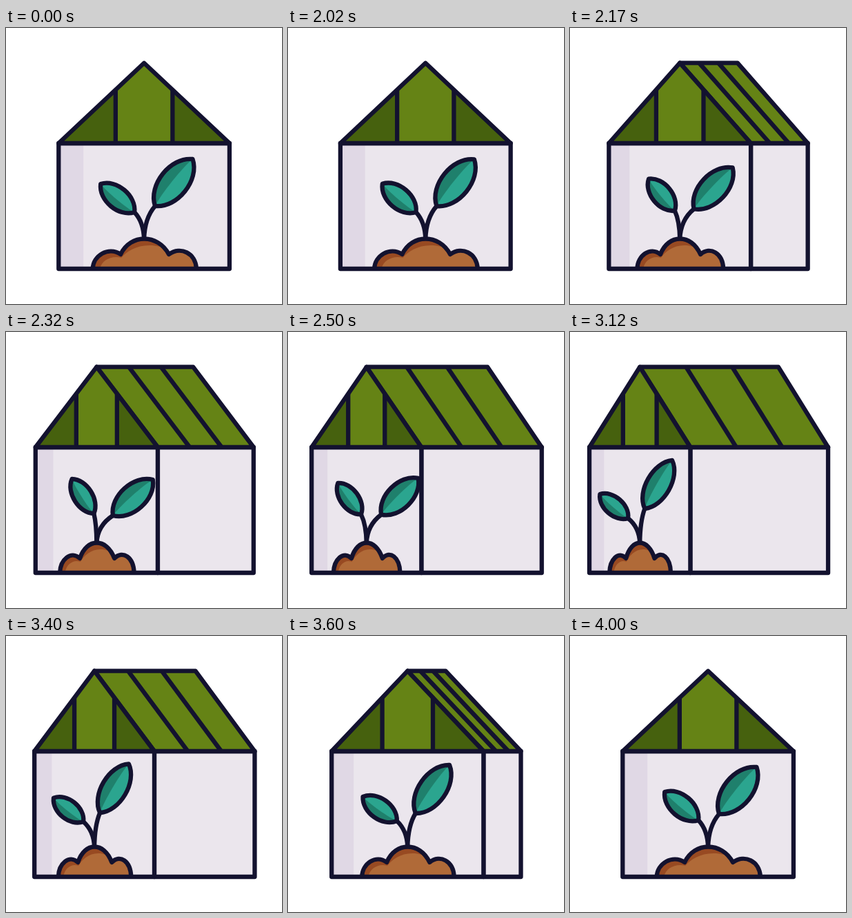
Write an HTML page with a canvas that moves like this. It is 400 px wide and 400 px high and loops after 4020 ms.

```html
<!DOCTYPE html>
<html lang="en">
<head>
<meta charset="utf-8">
<title>Greenhouse</title>
<style>
html, body { margin: 0; width: 100%; height: 100%; overflow: hidden; background: #fff; }
canvas { display: block; width: 400px; height: 400px; }
</style>
</head>
<body>
<canvas id="stage"></canvas>
<script>
const canvas = document.getElementById('stage');
const ctx = canvas.getContext('2d');
const dpr = window.devicePixelRatio || 1;
canvas.width = canvas.height = 400 * dpr;

const LOOP = 4020;
const INK = '#13122f', WALL = '#ebe6ed', SHADE = '#e0d8e5';
const ROOF = '#658315', ROOF_DARK = '#46610e';
const LEAF = '#2ba58f', LEAF_DARK = '#1f806c';
const SOIL = '#b06a38', SOIL_DARK = '#984a22';
const TOP = 50.7, EAVE = 167, FLOOR = 349;

// Sway poses: [x, y] of leaf base and tip, from the foot of the stem
const TIMES = [2000, 2320, 2720, 3120, 3600, 4000];
const RIGHT = [
  [16, -46, 70.5, -114], [33, -38, 114, -90], [29, -43, 109, -101],
  [12, -48, 79.5, -118], [13, -47, 68.5, -117], [16, -46, 70.5, -114]
];
const LEFT = [
  [-14, -37, -63, -78], [-5.6, -41, -50, -91], [-22.5, -37, -86, -75],
  [-29, -34, -98, -69], [-17.5, -36, -73, -71], [-14, -37, -63, -78]
];

function bezier(x1, x2, u) {
  if (u <= 0) return 0;
  if (u >= 1) return 1;
  let lo = 0, hi = 1;
  for (let i = 0; i < 30; i++) {
    const s = (lo + hi) / 2, r = 1 - s;
    if (3 * r * r * s * x1 + 3 * r * s * s * x2 + s * s * s < u) lo = s;
    else hi = s;
  }
  return lo * lo * (3 - 2 * lo);
}

// How far the house is turned: 0 front view, 1 fully turned
function turn(t) {
  return t < 3000
    ? bezier(0.14, 0.09, (t - 2000) / 1000)
    : 1 - bezier(0.59, 0.4, (t - 3000) / 1000);
}

function pose(keys, t) {
  if (t <= 2000 || t >= 4000) return keys[0];
  let i = 0;
  while (t >= TIMES[i + 1]) i++;
  const h = TIMES[i + 1] - TIMES[i], u = (t - TIMES[i]) / h;
  const slope = (k, n) => k < 1 || k > 4 ? 0
    : (keys[k + 1][n] - keys[k - 1][n]) / (TIMES[k + 1] - TIMES[k - 1]);
  return keys[i].map((a, n) => {
    const b = keys[i + 1][n], v = 1 - u;
    return a * (1 + 2 * u) * v * v + b * u * u * (3 - 2 * u)
      + h * (slope(i, n) * u * v * v - slope(i + 1, n) * u * u * v);
  });
}

function poly(points, fill, closed = true) {
  ctx.beginPath();
  points.forEach(([x, y]) => ctx.lineTo(x, y));
  if (closed) ctx.closePath();
  if (fill) { ctx.fillStyle = fill; ctx.fill(); }
}

function ink() {
  ctx.strokeStyle = INK;
  ctx.lineWidth = 6.3;
  ctx.lineJoin = 'round';
  ctx.stroke();
}

function line(x1, y1, x2, y2) {
  poly([[x1, y1], [x2, y2]], null, false);
  ink();
}

function box(x1, x2) {
  ctx.beginPath();
  ctx.rect(x1, EAVE, x2 - x1, FLOOR - EAVE);
}

function leafPath(bx, by, tx, ty, left, right) {
  const dx = tx - bx, dy = ty - by, len = Math.hypot(dx, dy);
  const nx = dy / len, ny = -dx / len;
  const at = (k, w) => [bx + dx * k + nx * w * 4 / 3, by + dy * k + ny * w * 4 / 3];
  ctx.beginPath();
  ctx.moveTo(bx, by);
  ctx.bezierCurveTo(...at(0.2, left), ...at(0.8, left), tx, ty);
  ctx.bezierCurveTo(...at(0.8, -right), ...at(0.2, -right), bx, by);
  ctx.closePath();
}

function leaf(keys, t, cx, s, half) {
  const [a, b, c, d] = pose(keys, t);
  const foot = 304, w = half * (0.6 + 0.4 * s);
  const bx = cx + a * s, by = foot + b, tx = cx + c * s, ty = foot + d;
  ctx.beginPath();
  ctx.moveTo(cx, foot + 2);
  ctx.quadraticCurveTo(cx + a * s * 0.05, foot + b * 0.62, bx, by);
  ink();
  leafPath(bx, by, tx, ty, w, w);
  ctx.fillStyle = LEAF_DARK;
  ctx.fill();
  leafPath(bx, by, tx, ty, w * 0.15, w);
  ctx.fillStyle = LEAF;
  ctx.fill();
  leafPath(bx, by, tx, ty, w, w);
  ink();
}

function mound(cx, s) {
  const X = x => cx + x * s;
  const curve = (a, b, c, d, e, f) => ctx.bezierCurveTo(X(a), b, X(c), d, X(e), f);
  const outline = () => {
    ctx.beginPath();
    ctx.moveTo(X(-74.5), FLOOR);
    curve(-74, 330, -52, 316, -34, 328);
    curve(-20, 298, 20, 298, 36, 328);
    curve(53, 316, 75, 326, 76, FLOOR);
  };
  outline();
  ctx.fillStyle = SOIL_DARK;
  ctx.fill();
  ctx.save();
  ctx.clip();
  ctx.beginPath();
  ctx.moveTo(X(-64), FLOOR);
  curve(-62, 336, -46, 329, -33, 333);
  curve(-24, 322, -4, 310, 24, 317);
  ctx.lineTo(X(60), 300);
  ctx.lineTo(X(90), FLOOR);
  ctx.fillStyle = SOIL;
  ctx.fill();
  ctx.restore();
  outline();
  ink();
}

function side(c, r, b) {
  const d = b - r, ridge = d + 1;
  box(r, b);
  ctx.fillStyle = WALL;
  ctx.fill();
  ink();
  poly([[c, TOP], [c + ridge, TOP], [b, EAVE], [r, EAVE]], ROOF);
  ink();
  for (const k of [1 / 3, 2 / 3]) line(c + ridge * k, TOP, r + d * k, EAVE);
}

function front(l, c, r, s, t) {
  const third = (r - l) / 6;
  const knee = TOP + (EAVE - TOP) / 3;
  box(l, r);
  ctx.fillStyle = WALL;
  ctx.fill();
  ctx.fillStyle = SHADE;
  ctx.fillRect(l, EAVE, (r - l) * 0.145, FLOOR - EAVE);

  leaf(LEFT, t, c, s, 15.3);
  leaf(RIGHT, t, c, s, 20.5);
  mound(c, s);
  box(l, r);
  ink();

  const gable = [[l, EAVE], [c, TOP], [r, EAVE]];
  poly(gable, ROOF_DARK);
  poly([[c - third, EAVE], [c - third, knee], [c, TOP], [c + third, knee], [c + third, EAVE]], ROOF);
  line(c - third, EAVE, c - third, knee);
  line(c + third, EAVE, c + third, knee);
  poly(gable);
  ink();
}

function draw(t) {
  const p = turn(t);
  const l = 76.3 - 49 * p, r = 323.9 - 152 * p, b = 323.9 + 51 * p;
  const c = (l + r) / 2, s = (r - l) / 248;
  ctx.setTransform(dpr, 0, 0, dpr, 0, 0);
  ctx.fillStyle = '#fff';
  ctx.fillRect(0, 0, 400, 400);
  if (p > 0.02) side(c, r, b);
  front(l, c, r, s, t);
}

const start = performance.now();
function tick() {
  draw((performance.now() - start) % LOOP);
  requestAnimationFrame(tick);
}
tick();
</script>
</body>
</html>
```
